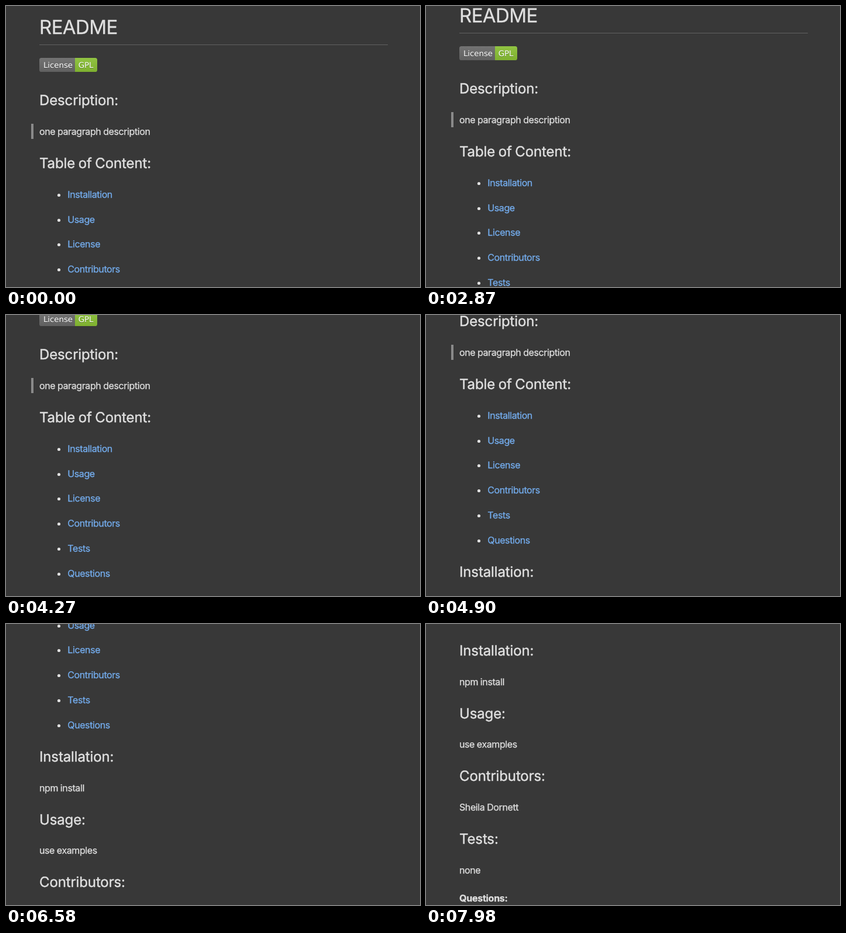
Recreate the animation shown at these times as an HTML page. Size 708 by 482 pixels, loop 8 s.

```html
<!DOCTYPE html>
<html lang="en">
<head>
<meta charset="utf-8">
<title>README preview</title>
<style>
  html, body { margin: 0; width: 100%; height: 100%; overflow: hidden; background: #383838; }
  svg { display: block; width: 708px; height: 482px; text-rendering: geometricPrecision; }
  /* A thin stroke gives the slightly heavier look of smoothed screen text. */
  text {
    font: 16px Inter, "Open Sans", sans-serif; letter-spacing: -.4px; word-spacing: -.3px;
    fill: #e0e0e0; stroke: #e0e0e0; stroke-width: .3px;
  }
  .h1 { font-size: 33px; letter-spacing: -.6px; }
  .h2 { font-size: 24px; letter-spacing: -.13px; word-spacing: -1px; stroke-width: .45px; }
  .strong { font-weight: 700; letter-spacing: -.25px; }
  .link { fill: #74adee; stroke: #74adee; }
  .badge text {
    font: 13.3px "DejaVu Sans", Verdana, sans-serif; letter-spacing: 0;
    fill: #fff; stroke: none; text-anchor: middle;
  }
  .badge .shadow { fill: #010101; opacity: .3; }
</style>
</head>
<body>
<svg viewBox="0 0 708 482">
  <defs>
    <linearGradient id="shine" x2="0" y2="1">
      <stop offset="0" stop-color="#bbb" stop-opacity=".1"/>
      <stop offset="1" stop-opacity=".1"/>
    </linearGradient>
    <clipPath id="round"><rect x="57" y="89" width="99" height="24" rx="3.6"/></clipPath>
  </defs>
  <g id="page">
    <rect x="57" y="66" width="596" height="1" fill="#626262"/>
    <g class="badge">
      <g clip-path="url(#round)">
        <rect x="57" y="89" width="61" height="24" fill="#6b6b6b"/>
        <rect x="118" y="89" width="38" height="24" fill="#8cc435"/>
        <rect x="57" y="89" width="99" height="24" fill="url(#shine)"/>
      </g>
      <text class="shadow" x="89" y="107.2">License</text>
      <text x="89" y="106">License</text>
      <text class="shadow" x="136.5" y="107.2">GPL</text>
      <text x="136.5" y="106">GPL</text>
    </g>
    <rect x="43" y="202" width="4" height="26" fill="#8a8a8a"/>
  </g>
</svg>
<script>
const page = document.getElementById('page');

function add(tag, attrs, label = '') {
  const node = document.createElementNS('http://www.w3.org/2000/svg', tag);
  for (const key in attrs) node.setAttribute(key, attrs[key]);
  node.textContent = label;
  page.append(node);
}
const line = (label, y, style = 'body', x = 57) => add('text', { x, y, class: style }, label);

line('README', 48, 'h1');
line('Description:', 170, 'h2');
line('one paragraph description', 221);
line('Table of Content:', 278, 'h2');

['Installation', 'Usage', 'License', 'Contributors', 'Tests', 'Questions'].forEach((label, i) => {
  const y = Math.round(329 + i * 42.7);
  add('circle', { cx: 90.5, cy: y - 4.5, r: 2.6, fill: '#e0e0e0' });
  line(label, y, 'link', 105.3);
});

line('Installation:', 600, 'h2');
line('npm install', 651);
line('Usage:', 708, 'h2');
line('use examples', 758);
line('Contributors:', 815, 'h2');
line('Sheila Dornett', 866);
line('Tests:', 923, 'h2');
line('none', 974);
line('Questions:', 1022, 'strong');

// Scroll position over time (ms, px), joined by a smooth curve.
const LOOP = 8000, STEP = 70;
const stops = [[2100, 0], [2870, 20], [3570, 46], [4270, 94], [5530, 218], [6580, 364], [7980, 546]];

function slope(i) {
  const a = stops[Math.max(i - 1, 0)], b = stops[Math.min(i + 1, stops.length - 1)];
  return (b[1] - a[1]) / (b[0] - a[0]);
}

function scrollAt(time) {
  if (time <= stops[0][0]) return 0;
  const i = stops.findIndex(stop => stop[0] >= time) - 1;
  if (i < 0) return stops[stops.length - 1][1];
  const [t0, y0] = stops[i], [t1, y1] = stops[i + 1];
  const span = t1 - t0, u = (time - t0) / span, v = 1 - u;
  return y0 * v * v * (1 + 2 * u) + y1 * u * u * (3 - 2 * u)
    + span * u * v * (slope(i) * v - slope(i + 1) * u);
}

const start = performance.now();
function draw() {
  const time = Math.max(0, performance.now() - start) % LOOP;
  const held = Math.floor(time / STEP) * STEP;
  page.setAttribute('transform', `translate(0 ${-Math.round(scrollAt(held))})`);
  requestAnimationFrame(draw);
}
draw();
</script>
</body>
</html>
```
